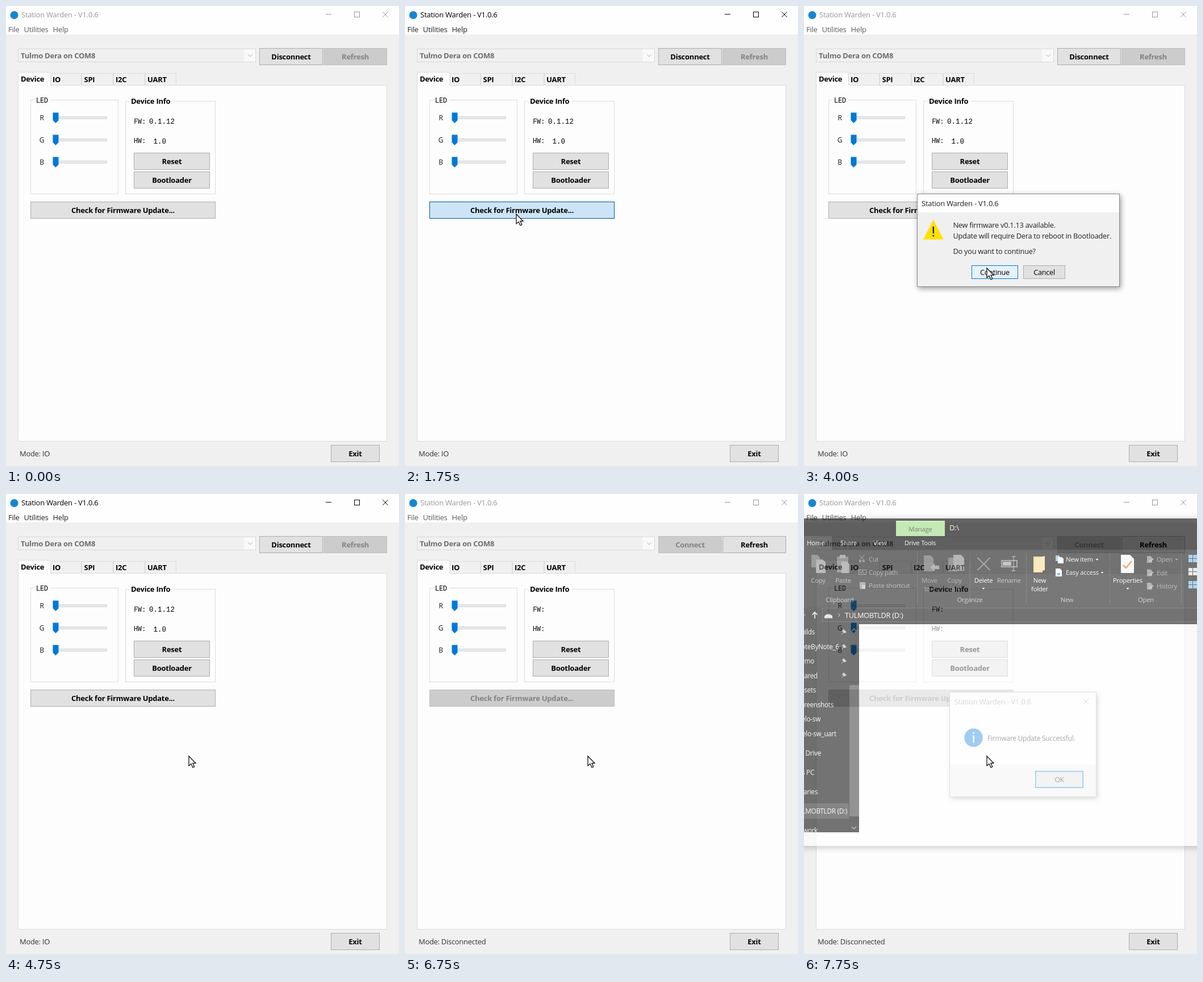
An HTML page with a canvas that plays this animation: 692 by 809 pixels, repeating every 8000 ms.

```html
<!DOCTYPE html>
<html lang="en">
<head>
<meta charset="utf-8">
<title>Firmware update</title>
<style>
html, body { margin: 0; width: 100%; height: 100%; overflow: hidden; background: #f0f0f0; }
canvas { display: block; }
</style>
</head>
<body>
<canvas id="stage" width="692" height="809"></canvas>
<script>
const W = 692, H = 809, LOOP = 8000;
const APP = 'Station Warden - V1.0.6';
const SANS = '"Open Sans", "Noto Sans", sans-serif';
const MONO = '"DejaVu Sans Mono", monospace';
const COURIER = '"Liberation Mono", monospace';
const BLUE = '#0078d7';

const stage = document.getElementById('stage').getContext('2d');
const sheet = document.createElement('canvas');
sheet.width = W;
sheet.height = H;
const sheetCtx = sheet.getContext('2d');
let g = stage;

function text(s, x, y, { size = 13, color = '#000', bold = false, align = 'left', font = SANS } = {}) {
  g.font = `${bold ? 'bold ' : ''}${size}px ${font}`;
  g.letterSpacing = font === SANS ? '-0.25px' : '0px';
  g.textAlign = align;
  g.fillStyle = color;
  g.fillText(s, x, y);
}

function rect(x, y, w, h, fill) {
  g.fillStyle = fill;
  g.fillRect(x, y, w, h);
}

function box(x, y, w, h, fill, stroke, lw = 1) {
  if (fill) rect(x, y, w, h, fill);
  g.strokeStyle = stroke;
  g.lineWidth = lw;
  g.strokeRect(x + lw / 2, y + lw / 2, w - lw, h - lw);
}

function poly(points, fill, stroke, lw = 1, close = true) {
  g.beginPath();
  points.forEach(([x, y]) => g.lineTo(x, y));
  if (close) g.closePath();
  if (fill) { g.fillStyle = fill; g.fill(); }
  if (stroke) { g.strokeStyle = stroke; g.lineWidth = lw; g.stroke(); }
}

const line = (points, color, lw = 1) => poly(points, null, color, lw, false);

function disc(x, y, r, fill) {
  g.beginPath();
  g.arc(x, y, r, 0, Math.PI * 2);
  g.fillStyle = fill;
  g.fill();
}

function cross(x, y, r, color, lw = 1) {
  line([[x - r, y - r], [x + r, y + r]], color, lw);
  line([[x + r, y - r], [x - r, y + r]], color, lw);
}

// Paint a group on its own sheet, then blend it as one.
function layer(alpha, scale, cx, cy, draw) {
  sheetCtx.clearRect(0, 0, W, H);
  g = sheetCtx;
  draw();
  g = stage;
  g.save();
  g.globalAlpha = alpha;
  g.translate(cx, cy);
  g.scale(scale, scale);
  g.drawImage(sheet, -cx, -cy);
  g.restore();
}

const LOOKS = {
  normal: ['#e1e1e1', '#adadad', '#000'],
  disabled: ['#cccccc', '#bfbfbf', '#838383'],
  hover: ['#e5f1fb', BLUE, '#000'],
  fading: ['#e2e7eb', '#8aa3b8', '#000'],
  pressed: ['#cce4f7', '#005499', '#000'],
  focus: ['#e1e1e1', BLUE, '#222', 1.5]
};

function button(label, x, y, w, h, look = 'normal', opts = { bold: true }) {
  const [fill, edge, color, lw] = LOOKS[look];
  box(x, y, w, h, fill, edge, lw);
  text(label, x + w / 2, y + h / 2 + 5, { ...opts, color, align: 'center' });
}

function group(label, x, y, w, h, gap, opts) {
  box(x, y, w, h, null, '#dcdcdc');
  rect(x + 7, y, gap, 1, '#fdfdfd');
  text(label, x + 10, y + 5, opts);
}

function slider(label, y) {
  text(label, 63, y + 4.5, { size: 12, align: 'center', color: '#111' });
  box(83, y - 2, 95, 5, '#e7eaea', '#d6d6d6');
  poly([[82.5, y - 8.5], [92.5, y - 8.5], [92.5, y + 5], [87.5, y + 10], [82.5, y + 5]], BLUE);
}

function titleBar(active) {
  const ink = active ? '#000' : '#999';
  rect(0, 0, W, 50, '#fefefe');
  disc(14.5, 16, 7, '#1486d2');
  text(APP, 27, 20, { color: ink });
  line([[563, 14.5], [573, 14.5]], ink);
  box(613, 10, 10, 10, null, ink);
  cross(668, 15, 4.7, ink);
  const menu = { color: active ? '#222' : '#5c5c5c' };
  text('File', 4, 46, menu);
  text('Utilities', 31.5, 46, menu);
  text('Help', 82.5, 46, menu);
}

function tabs() {
  const names = ['IO', 'SPI', 'I2C', 'UART'];
  const edges = [78, 133, 189, 245, 300];
  names.forEach((name, i) => {
    box(edges[i], 118, edges[i + 1] - edges[i], 22, '#f0f0f0', '#dcdcdc');
    text(name, [82, 137.5, 193, 249][i], 134, { bold: true });
  });
  box(21, 139, 650, 627, '#fdfdfd', '#dcdcdc');
  box(21, 116, 58, 24, '#fdfdfd', '#dcdcdc');
  rect(22, 138, 56, 3, '#fdfdfd');
  text('Device', 26, 133, { bold: true });
}

function checkLook(t) {
  if (t >= 5750) return 'disabled';
  if (t >= 2250) return 'normal';
  if (t >= 1750) return 'pressed';
  if (t >= 1250) return 'hover';
  if (t >= 1000) return 'normal';
  if (t >= 750) return 'fading';
  return t >= 500 ? 'hover' : 'normal';
}

function mainWindow(t) {
  const linked = t < 5750, done = t >= 6750;
  rect(0, 0, W, H, '#f0f0f0');
  titleBar((t >= 1750 && t < 2250) || (t >= 4750 && t < 6750));

  box(21, 75, 419, 24, '#f0f0f0', '#d9d9d9');
  rect(419, 76, 20, 22, '#f9f9f9');
  line([[426, 85], [430, 89], [434, 85]], '#a8a8a8');
  text('Tulmo Dera on COM8', 26, 91.5, { bold: true, color: '#6d6d6d' });
  button(linked ? 'Disconnect' : 'Connect', 446, 74, 112, 30, done ? 'disabled' : 'normal');
  button('Refresh', 559, 74, 112, 30, done ? 'normal' : 'disabled');

  tabs();
  group('LED', 43, 165, 155, 166, 28, { size: 11.7, font: MONO });
  'RGB'.split('').forEach((c, i) => slider(c, 196 + 39 * i));
  group('Device Info', 210, 167, 159, 164, 77, { bold: true });
  text('FW:', 225, 207, { size: 11.8, font: MONO, color: '#111' });
  text('HW:', 225, 241, { size: 11.8, font: MONO, color: '#111' });
  if (linked) {
    text('0.1.12', 252, 207, { size: 12.5, font: COURIER });
    text('1.0', 259.5, 242, { size: 12.5, font: COURIER });
  }
  button('Reset', 225, 258, 134, 30);
  button('Bootloader', 225, 291, 134, 30);
  button('Check for Firmware Update...', 43, 344, 326, 30, checkLook(t));
  button('Exit', 572, 772, 86, 30);
  text('Mode: ' + (linked ? 'IO' : 'Disconnected'), 24, 792, { size: 12.9, color: '#333' });
}

function panel(x, y, w, h) {
  g.save();
  g.shadowColor = 'rgba(0,0,0,.38)';
  g.shadowBlur = 9;
  g.shadowOffsetX = 2;
  g.shadowOffsetY = 3;
  rect(x, y, w, h, '#f0f0f0');
  g.restore();
}

function askDialog(look) {
  panel(199, 330, 357, 164);
  rect(200, 331, 355, 32, '#fefefe');
  box(199, 330, 357, 164, null, '#8a8a8a');
  text(APP, 207, 352, { color: '#222' });
  poly([[227.8, 376], [245.5, 410.5], [210, 410.5]], '#ffe100');
  rect(226.6, 388, 2.4, 12, '#222');
  disc(227.8, 404, 1.5, '#222');
  const opts = { size: 12.75, color: '#222' };
  text('New firmware v0.1.13 available.', 262.5, 390, opts);
  text('Update will require Dera to reboot in Bootloader.', 262.5, 408.5, opts);
  text('Do you want to continue?', 262.5, 435.5, opts);
  button('Continue', 295, 456, 82, 24, look, { size: 12.7 });
  button('Cancel', 386, 456, 74, 24, 'normal', { size: 12.7 });
}

function doneDialog() {
  panel(256.5, 348.5, 258.5, 184.5);
  rect(257, 349, 258, 127, '#fefefe');
  box(256, 348, 259, 185, null, '#b0b0b0');
  text(APP, 264.5, 370, { color: '#999' });
  cross(496.5, 365, 4.5, '#999');
  disc(298.5, 428.5, 16.2, '#1080dc');
  rect(297.4, 424.5, 2.4, 13, '#fff');
  disc(298.6, 420.3, 1.6, '#fff');
  text('Firmware Update Successful.', 323, 434, { size: 12, color: '#222' });
  button('OK', 407, 487, 85, 30, 'focus', { size: 12 });
}

const DIM = '#8a8a8a', BACK = '#666', FRONT = '#909090';
const RIBBON = '#202020', NAV = '#191919';

function ribbonLabel(s, x, y, color = '#fff', align = 'center') {
  text(s, x, y, { size: 11.3, color, align });
}

function caret(x, y, color = '#fff') {
  poly([[x - 2.5, y - 1], [x + 2.5, y - 1], [x, y + 2]], color);
}

function page(x, y, w, h, fill) {
  const c = w * .3;
  poly([[x, y], [x + w - c, y], [x + w, y + c], [x + w, y + h], [x, y + h]], fill);
}

function ribbon() {
  rect(0, 98, W, 101, RIBBON);
  rect(162, 47, 86, 27, '#a6e78e');
  text('Manage', 205, 66, { size: 11.5, color: '#333', align: 'center' });
  text('D:\\', 256, 64, { size: 13, color: '#fff' });
  rect(0, 74, 49, 24, RIBBON);
  [['Home', 5], ['Share', 64], ['View', 122], ['Drive Tools', 177]]
    .forEach(([s, x]) => ribbonLabel(s, x, 90, '#fff', 'left'));
  [199, 292, 391, 538, 664].forEach(x => rect(x, 104, 1, 88, '#404040'));

  page(13, 107, 15, 22, BACK);
  page(21, 115, 17, 24, FRONT);
  rect(58, 110, 20, 28, BACK);
  rect(63, 107, 10, 6, FRONT);
  page(66, 119, 14, 20, FRONT);
  ribbonLabel('Copy', 25, 156, '#aaa');
  ribbonLabel('Paste', 69, 156, '#aaa');
  cross(102, 112, 4, DIM);
  disc(99, 118, 2, DIM);
  disc(105, 118, 2, DIM);
  box(96, 133, 14, 9, null, DIM);
  line([[98, 135], [101, 140], [103, 135], [106, 140]], DIM);
  rect(98, 155, 10, 12, DIM);
  rect(102, 160, 6, 7, '#bbb');
  ['Cut', 'Copy path', 'Paste shortcut'].forEach((s, i) => ribbonLabel(s, 114, 119 + 23 * i, '#999', 'left'));

  page(211, 108, 17, 28, BACK);
  poly([[222, 129], [230, 122], [230, 126], [238, 126], [238, 132], [230, 132], [230, 136]], FRONT);
  page(254, 112, 16, 24, BACK);
  page(263, 107, 19, 28, FRONT);
  ribbonLabel('Move', 221, 156, DIM);
  ribbonLabel('Copy', 265, 156, DIM);
  ribbonLabel('to', 217, 171, DIM);
  ribbonLabel('to', 261, 171, DIM);
  caret(228, 167, DIM);
  caret(272, 167, DIM);
  cross(316.5, 123, 11, '#777', 2);
  box(347, 116, 29, 13, null, DIM, 2);
  rect(350, 119, 15, 7, '#aaa');
  line([[366, 110], [372, 110], [369, 110], [369, 135], [366, 135], [372, 135]], '#aaa');
  ribbonLabel('Delete', 316, 156);
  caret(316, 166);
  ribbonLabel('Rename', 361, 156, '#aaa');

  rect(404, 110, 16, 28, '#f8d779');
  poly([[406, 113], [424, 109], [424, 134], [406, 138]], '#ffe9a0');
  ribbonLabel('New', 415, 156);
  ribbonLabel('folder', 415, 171);
  page(443, 108, 8, 10, '#8cc8f0');
  page(447, 111, 10, 11, '#fff');
  page(443, 131, 11, 14, '#fff');
  rect(446, 139, 5, 4, '#50a0e0');
  ribbonLabel('New item', 461, 119, '#fff', 'left');
  ribbonLabel('Easy access', 461, 142, '#fff', 'left');
  caret(516, 115);
  caret(525, 138);

  page(558, 107, 23, 32, '#fff');
  line([[562, 125], [567, 130], [577, 118]], '#f07828', 2.5);
  ribbonLabel('Properties', 570, 156);
  caret(570, 166);
  ['Open', 'Edit', 'History'].forEach((s, i) => {
    const y = 109 + 23.5 * i;
    page(604, y, 9, 12, DIM);
    line([[608, y + 10], [615, y + 5]], '#bbb', 2);
    ribbonLabel(s, 621, 119 + 23.5 * i, '#999', 'left');
  });
  caret(656, 115, DIM);
  ['#7cc4f4', '#e8e8e8', '#7cc4f4'].forEach((c, i) => {
    for (let k = 0; k < 4; k++) rect(677 + 8 * (k % 2), 107 + 23 * i + 7 * (k >> 1), 7, 6, c);
  });
  [['Clipboard', 63], ['Organize', 292], ['New', 463], ['Open', 602]]
    .forEach(([s, x]) => ribbonLabel(s, x, 190, '#bbb'));
}

function sidebar() {
  const rows = [
    ['Builds', 19, 247], ['NoteByNote_6', 62, 273], ['Tulmo', 18, 298], ['Shared', 24, 324],
    ['Assets', 21, 349], ['Screenshots', 52, 375], ['Pelo-sw', 29, 400], ['Pelo-sw_uart', 57, 426],
    ['Drive', 30, 460], ['This PC', 18, 494], ['Libraries', 24, 528], ['TULMOBTLDR (D:)', 76, 562],
    ['Network', 24, 596]
  ];
  g.save();
  g.beginPath();
  g.rect(0, 229, 97, 366);
  g.clip();
  rect(0, 229, 97, 366, NAV);
  rect(0, 544, 79, 27, '#383838');
  rect(80, 229, 17, 366, '#171717');
  rect(80, 336, 17, 231, '#4d4d4d');
  line([[84, 241], [88, 237], [92, 241]], '#999', 1.5);
  line([[84, 585], [88, 589], [92, 585]], '#999', 1.5);
  rows.forEach(([s, x, y]) => text(s, x, y, { size: 11.7, color: '#fff', align: 'right' }));
  [242, 268, 293, 318].forEach(y => {
    poly([[70, y - 4], [75, y + 1], [71, y + 3], [67, y - 1]], '#bbb');
    line([[66, y + 5], [70, y + 1]], '#bbb');
  });
  g.restore();
}

function explorer() {
  g.save();
  g.shadowColor = 'rgba(0,0,0,.4)';
  g.shadowBlur = 12;
  g.shadowOffsetY = 2;
  rect(-20, 43, W + 40, 576, '#fff');
  g.restore();
  rect(0, 43, W, 156, '#000');
  rect(0, 199, W, 30, NAV);
  ribbon();
  box(32, 200, 680, 25, null, '#404040');
  line([[-3, 211], [0, 214], [3, 211]], '#bbb');
  line([[19, 219], [19, 208]], '#fff', 1.6);
  line([[14.5, 212.5], [19, 208], [23.5, 212.5]], '#fff', 1.6);
  poly([[36, 214.5], [40, 211.5], [46, 211.5], [50, 214.5], [50, 218.5], [36, 218.5]], '#ddd');
  line([[60, 210], [63, 213], [60, 216]], '#ccc');
  text('TULMOBTLDR (D:)', 72, 217.5, { size: 12.7, color: '#fff' });
  sidebar();
}

// Held pointer positions: time, x, y.
const POINTER = [
  [500, 194, 352], [750, 193, 334], [1000, 194, 341], [1250, 196, 365], [1500, 196, 366],
  [3250, 272, 384], [3500, 313, 444], [3750, 322, 458], [4000, 322, 461]
];

function pointer(t) {
  const key = POINTER.filter(k => k[0] <= t).pop();
  if (!key) return;
  const shape = [[0, 0], [0, 17], [4, 13.4], [7, 20], [9.8, 18.8], [6.9, 12.3], [12, 12.3]];
  poly(shape.map(([x, y]) => [key[1] + x, key[2] + y]), '#fff', '#000', 1.2);
}

function paint(t) {
  mainWindow(t);
  if (t >= 2250 && t < 4750) {
    const opening = t < 2500;
    const look = t >= 4500 ? 'pressed' : t >= 4000 ? 'hover' : 'focus';
    layer(opening ? .88 : 1, opening ? .995 : 1, 377.5, 412, () => askDialog(look));
  }
  if (t >= 7500) {
    const opening = t < 7750;
    layer(opening ? .96 : 1, opening ? .995 : 1, 385.5, 441, doneDialog);
  }
  if (t >= 7750) layer(.6, 1, 0, 0, explorer);
  pointer(t);
}

const start = performance.now();
function tick() {
  paint((performance.now() - start) % LOOP);
  requestAnimationFrame(tick);
}
tick();
</script>
</body>
</html>
```
